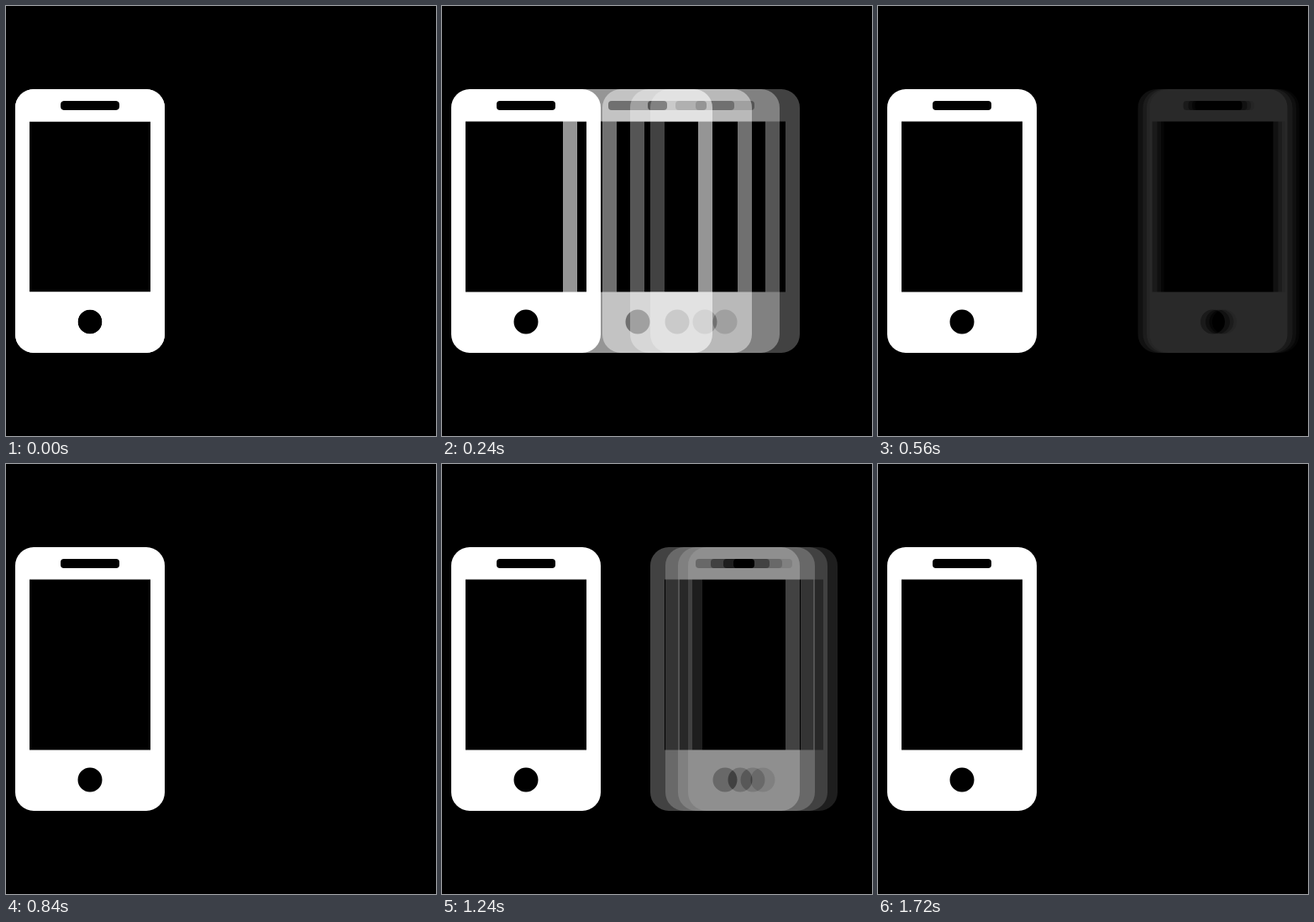
Recreate the animation shown at these times as an HTML page without scripts. Size 512 by 512 pixels, loop 2560 ms.

```html
<!DOCTYPE html>
<html lang="en">
<head>
<meta charset="utf-8">
<title>Phone with fading echoes</title>
<style>
  html, body { margin: 0; width: 100%; height: 100%; overflow: hidden; background: #000; }
  svg { display: block; width: 100%; height: 100%; }

  /* Each run sends four echoes out, 40 ms apart; they fade with distance. */
  .echo {
    --delay: calc(var(--start) + var(--i) * 40ms - 5ms);
    transform: translateX(calc(var(--x, 320) * 1px));
    opacity: calc(1 - var(--x, 320) / 320);
    animation: slide 2560ms step-end var(--delay) infinite;
  }
  .first { --start: 0ms; }
  .second { --start: 880ms; }
  .echo:nth-child(1) { --i: 0; }
  .echo:nth-child(2) { --i: 1; }
  .echo:nth-child(3) { --i: 2; }
  .echo:nth-child(4) { --i: 3; }

  /* One stop per 40 ms: a quick launch, then a long glide. */
  @keyframes slide {
    0% { --x: 0; }
    1.5625% { --x: 12; }
    3.125% { --x: 64; }
    4.6875% { --x: 133; }
    6.25% { --x: 180; }
    7.8125% { --x: 213; }
    9.375% { --x: 237; }
    10.9375% { --x: 255; }
    12.5% { --x: 270; }
    14.0625% { --x: 282; }
    15.625% { --x: 292; }
    17.1875% { --x: 298.5; }
    18.75% { --x: 304.5; }
    20.3125% { --x: 309; }
    21.875% { --x: 312.5; }
    23.4375% { --x: 315; }
    25% { --x: 317; }
    26.5625% { --x: 318.5; }
    28.125% { --x: 319.4; }
    29.6875% { --x: 319.8; }
    31.25%, 100% { --x: 320; }
  }
</style>
</head>
<body>
<svg viewBox="0 0 512 512">
  <defs>
    <path id="phone" fill="#fff" fill-rule="evenodd" d="
      M33 99H167a22 22 0 0 1 22 22V391a22 22 0 0 1-22 22H33a22 22 0 0 1-22-22V121a22 22 0 0 1 22-22Z
      M69 113H131a4 4 0 0 1 4 4V120a4 4 0 0 1-4 4H69a4 4 0 0 1-4-4V117a4 4 0 0 1 4-4Z
      M28 137.5H172V340.5H28Z
      M85.5 376a14.5 14.5 0 0 1 29 0a14.5 14.5 0 0 1-29 0Z"/>
  </defs>
  <rect width="512" height="512"/>
  <g class="first">
    <use class="echo" href="#phone"/>
    <use class="echo" href="#phone"/>
    <use class="echo" href="#phone"/>
    <use class="echo" href="#phone"/>
  </g>
  <g class="second">
    <use class="echo" href="#phone"/>
    <use class="echo" href="#phone"/>
    <use class="echo" href="#phone"/>
    <use class="echo" href="#phone"/>
  </g>
  <use href="#phone"/>
</svg>
</body>
</html>
```
